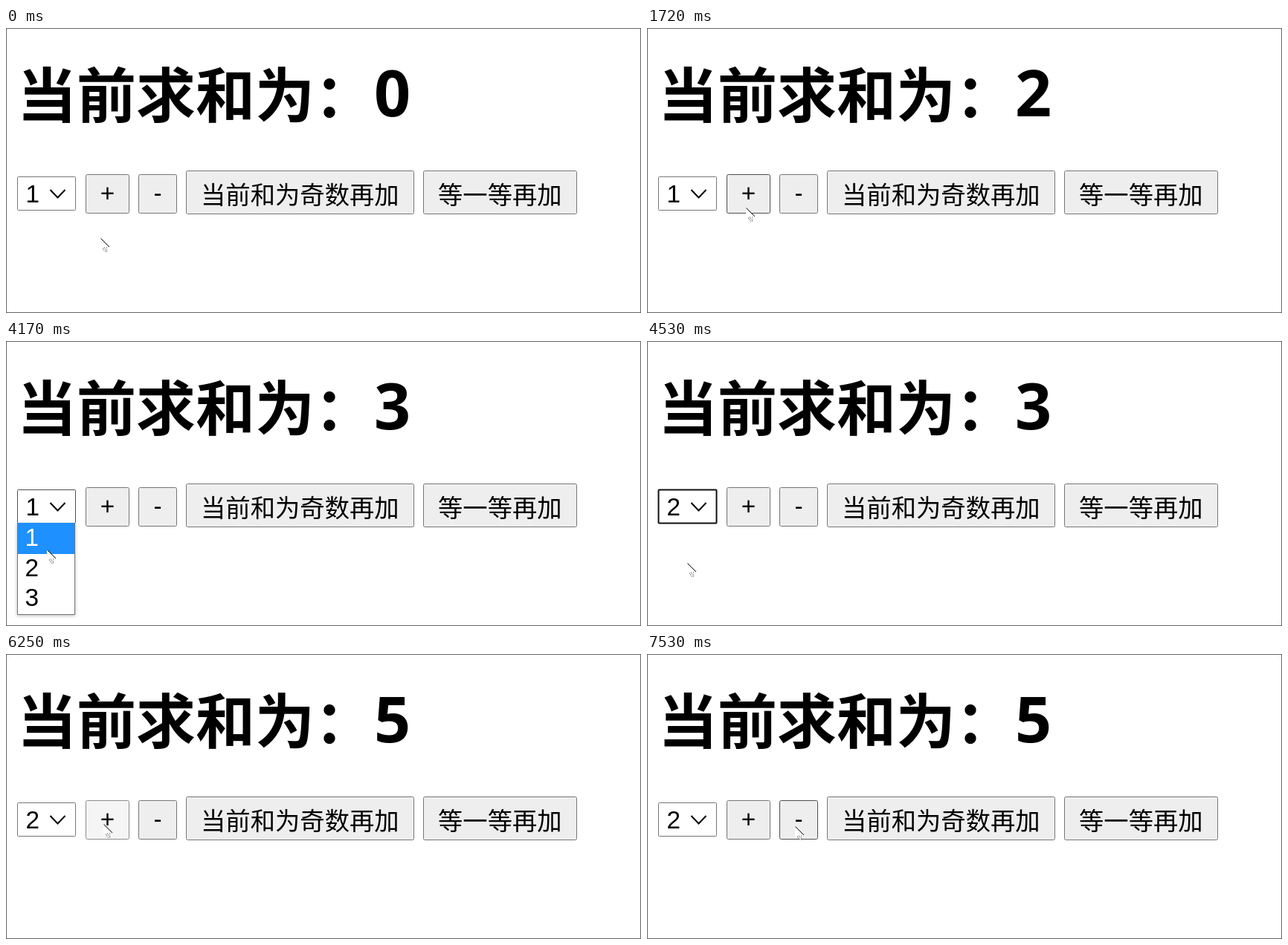
An HTML page that plays this animation: 854 px wide and 384 px high, repeating every 8000 ms.

```html
<!DOCTYPE html>
<html lang="zh-CN">
<head>
<meta charset="utf-8">
<title>当前求和</title>
<style>
html, body { margin: 0; width: 100%; height: 100%; overflow: hidden; background: #fff; }
svg { display: block; width: 100%; height: 100%; }
text { font: 33.33px "Liberation Sans", Arial, sans-serif; }
.zh { font-family: "Noto Sans CJK SC", "Noto Sans CJK", sans-serif; }
.title { font-size: 80px; font-weight: 700; }
.sum { font: 700 86px "Open Sans", "Noto Sans", sans-serif; }
.mid { text-anchor: middle; }
.button rect { fill: #eee; stroke: #767676; }
.button.hover rect { fill: #e5e5e5; stroke: #4f4f4f; }
.button.active rect { fill: #f5f5f5; stroke: #8d8d8d; }
.button.done rect { stroke: #4f4f4f; }
.select rect { fill: #fff; stroke: #767676; }
.select.hover rect { stroke: #4f4f4f; }
.select.ring rect { stroke: #101010; stroke-width: 2px; }
.list { fill: #fff; stroke: #767676; filter: drop-shadow(0 1px 2px rgba(0, 0, 0, .3)); }
</style>
</head>
<body>
<svg viewBox="0 0 854 384">
  <rect x=".5" y=".5" width="853" height="383" fill="#fff" stroke="#666"/>
  <text class="zh title" x="15" y="120">当前求和为：</text>
  <text class="sum" id="sum" x="495" y="119">0</text>

  <g class="select" id="select">
    <rect x="15.5" y="200.5" width="78" height="45" rx="1"/>
    <text id="pick" x="26.5" y="235">1</text>
    <path d="M59.5 218L69.5 228.5L79.5 218" fill="none" stroke="#000" stroke-width="2"/>
  </g>
  <g class="button" id="plus">
    <rect x="107.5" y="197.5" width="58" height="52" rx="2"/>
    <text class="mid" x="136.5" y="234">+</text>
  </g>
  <g class="button" id="minus">
    <rect x="178.5" y="197.5" width="51" height="52" rx="2"/>
    <text class="mid" x="204" y="234">-</text>
  </g>
  <g class="button">
    <rect x="242.5" y="192.5" width="306" height="58" rx="2"/>
    <text class="zh" x="262" y="236.5">当前和为奇数再加</text>
  </g>
  <g class="button">
    <rect x="561.5" y="192.5" width="206" height="58" rx="2"/>
    <text class="zh" x="581" y="236.5">等一等再加</text>
  </g>

  <g id="menu">
    <rect class="list" x="15.5" y="245.5" width="77" height="123"/>
    <rect id="mark" x="16" width="76" fill="#1e90ff"/>
    <text class="option" x="25.5" y="276">1</text>
    <text class="option" x="25.5" y="317">2</text>
    <text class="option" x="25.5" y="357">3</text>
  </g>

  <g id="cursor">
    <path d="M0 0V16L3.5 13L6.5 19H9L7 12.5H12Z" fill="#fff"/>
    <path d="M.5 .5L12 12" stroke="#000" fill="none"/>
    <path d="M3 14h1M5 13h1M8 13h1M4 16h1M6 15h1M8 16h1M6 18h1M8 18h1" stroke="#333"/>
  </g>
</svg>
<script>
const LOOP = 8000, STEP = 60;
const el = id => document.getElementById(id);
const options = [...document.querySelectorAll('.option')];
const rowEdges = [245, 287, 327, 368];

// Pointer waypoints: time, x, y
const path = [
  [0, 127, 283], [129, 127, 283], [130, 128, 281], [250, 128, 281], [610, 133, 242],
  [3080, 133, 242], [3140, 101, 236], [3200, 78, 231], [3320, 60, 228],
  [3810, 60, 228], [4170, 55, 281], [4350, 54, 299],
  [4850, 54, 299], [5210, 129, 241], [5390, 131, 229],
  [6560, 131, 229], [6860, 168, 237], [7110, 199, 232], [LOOP, 199, 232]
];

// Each entry changes only the properties it names
const steps = [
  [0, { plus: '', minus: '', select: '', sum: 0, pick: 1, row: 0 }],
  [550, { plus: 'hover' }],
  [790, { plus: 'active' }],
  [910, { plus: 'done', sum: 1 }],
  [1600, { plus: 'active' }],
  [1720, { plus: 'done', sum: 2 }],
  [2410, { plus: 'active' }],
  [2530, { plus: 'done', sum: 3 }],
  [3140, { plus: '' }],
  [3200, { select: 'hover' }],
  [3440, { row: 1 }],
  [4230, { row: 2 }],
  [4530, { row: 0, pick: 2, select: 'ring' }],
  [5210, { plus: 'hover' }],
  [5450, { plus: 'active', select: '' }],
  [5510, { plus: 'done', sum: 5 }],
  [6250, { plus: 'active' }],
  [6310, { plus: 'done', sum: 7 }],
  [6860, { plus: '' }],
  [6980, { minus: 'hover' }],
  [7410, { minus: 'active' }],
  [7530, { minus: 'done', sum: 5 }]
];

function pointerAt(t) {
  const i = path.findIndex(p => p[0] > t);
  const [t0, x0, y0] = path[i - 1], [t1, x1, y1] = path[i];
  const k = Math.floor((t - t0) / STEP) * STEP / (t1 - t0);
  return [x0 + (x1 - x0) * k, y0 + (y1 - y0) * k].map(Math.round);
}

function stateAt(t) {
  return Object.assign({}, ...steps.filter(s => s[0] <= t).map(s => s[1]));
}

function draw(t) {
  const s = stateAt(t);
  el('plus').setAttribute('class', 'button ' + s.plus);
  el('minus').setAttribute('class', 'button ' + s.minus);
  el('select').setAttribute('class', 'select ' + s.select);
  el('sum').textContent = s.sum;
  el('pick').textContent = s.pick;
  el('menu').style.display = s.row ? '' : 'none';
  if (s.row) {
    const top = rowEdges[s.row - 1];
    el('mark').setAttribute('y', top);
    el('mark').setAttribute('height', rowEdges[s.row] - top);
    options.forEach((o, i) => o.setAttribute('fill', i === s.row - 1 ? '#fff' : '#000'));
  }
  el('cursor').setAttribute('transform', `translate(${pointerAt(t)})`);
}

const start = performance.now();
function tick() {
  draw((performance.now() - start) % LOOP);
  requestAnimationFrame(tick);
}
tick();
</script>
</body>
</html>
```
